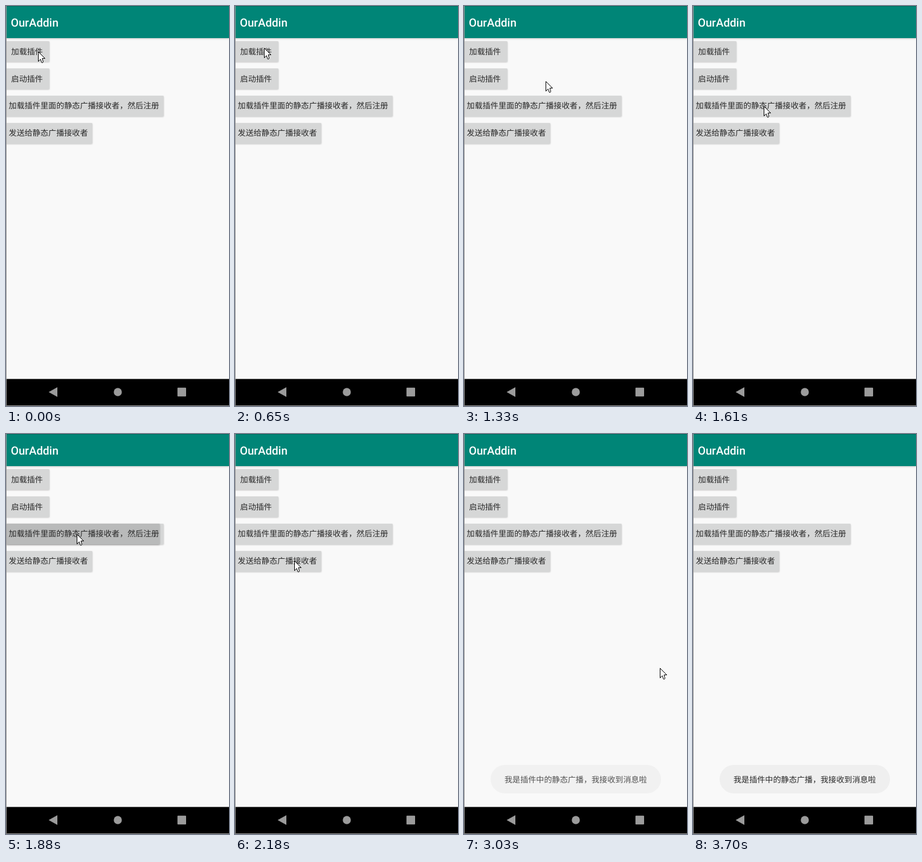
Recreate the animation shown at these times as an HTML page. Size 369 px wide and 660 px high, loop 4.1 s.

```html
<!DOCTYPE html>
<html lang="zh-CN">
<head>
<meta charset="utf-8">
<title>OurAddin</title>
<style>
  html, body { margin: 0; width: 100%; height: 100%; overflow: hidden; background: #f9f9f9; }
  svg { display: block; width: 369px; height: 660px; }

  text { font: 13.1px "Noto Sans CJK SC", "Noto Sans CJK", sans-serif; fill: #282828; text-rendering: geometricPrecision; }
  .title { font: 500 18.75px Roboto, sans-serif; fill: #fff; }
  .bar { fill: #008577; filter: drop-shadow(0 1px 1.5px rgba(0, 0, 0, .2)); }
  .btn { fill: #d6d7d7; filter: drop-shadow(0 1px 1px rgba(0, 0, 0, .2)); }
  .press { fill: #b9baba; filter: drop-shadow(0 1px 1.5px rgba(0, 0, 0, .3)); opacity: 0; }
  .nav { fill: #9b9b9b; }

  /* every change is a hard step in a 4.1 s loop */
  .press, .toast, .cursor { animation: 4100ms step-end infinite; }
  .load { animation-name: load; }
  .register { animation-name: register; }
  .send { animation-name: send; }
  .toast { animation-name: toast; opacity: 0; }
  .cursor { animation-name: move; }

  @keyframes load {
    0%, 26.09%, 100% { opacity: 0; }
    23.16% { opacity: 1; }
  }
  @keyframes register {
    0%, 53.16%, 100% { opacity: 0; width: 253px; }
    45.85% { opacity: 1; width: 253px; }
    49.51% { opacity: 1; width: 260px; }
  }
  @keyframes send {
    0%, 70.97%, 100% { opacity: 0; }
    63.65% { opacity: 1; }
    67.31% { opacity: .5; }
  }
  @keyframes toast {
    0%, 100% { opacity: 0; }
    67.31% { opacity: .3; }
    70.97% { opacity: .55; }
    73.9% { opacity: .8; }
    77.55% { opacity: 1; }
  }
  @keyframes move {
    0% { transform: translate(53px, 75px); }
    12.19% { transform: translate(48px, 72px); }
    15.85% { transform: translate(48px, 69px); }
    19.51% { transform: translate(48px, 70px); }
    29.51% { transform: translate(95px, 99px); }
    32.43% { transform: translate(135px, 124px); }
    36.09% { transform: translate(124px, 148px); }
    39.26% { transform: translate(117px, 165px); }
    49.51% { transform: translate(105px, 197px); }
    53.16% { transform: translate(98px, 209px); }
    57.07% { transform: translate(98px, 210px); }
    67.31% { transform: translate(150px, 245px); }
    70.97% { transform: translate(255px, 325px); }
    73.9% { transform: translate(324px, 386px); }
    77.55% { transform: translate(330px, 430px); }
    80.48% { transform: translate(330px, 500px); }
    83.65% { transform: translate(329px, 575px); }
    86.58% { transform: translate(327px, 636px); }
    90.24%, 100% { transform: translate(400px, 700px); }
  }
</style>
</head>
<body>
<svg width="369" height="660" viewBox="0 0 369 660">
  <rect width="369" height="660" fill="#f9f9f9"/>

  <rect class="bar" width="369" height="53"/>
  <rect width="369" height="1" fill="#006b60"/>
  <text class="title" x="8" y="34">OurAddin</text>

  <rect class="btn" x="-2" y="58" width="74" height="34" rx="1.5"/>
  <rect class="btn" x="-2" y="103" width="74" height="34" rx="1.5"/>
  <rect class="btn" x="-2" y="148" width="263" height="34" rx="1.5"/>
  <rect class="btn" x="-2" y="193" width="145" height="34" rx="1.5"/>

  <rect class="press load" x="1" y="58" width="71" height="34" rx="1.5"/>
  <rect class="press register" x="1" y="148" width="253" height="34"/>
  <rect class="press send" x="1" y="193" width="142" height="34" rx="1.5"/>

  <text x="8.6" y="79.7">加载插件</text>
  <text x="8.6" y="124.5">启动插件</text>
  <text x="4.6" y="169.3">加载插件里面的静态广播接收者，然后注册</text>
  <text x="4.6" y="214">发送给静态广播接收者</text>

  <g class="toast">
    <rect x="44" y="546" width="282" height="47" rx="23.5" fill="#efefef"/>
    <text x="67" y="574.7">我是插件中的静态广播，我接收到消息啦</text>
  </g>

  <rect y="615.4" width="369" height="44.6"/>
  <g class="nav">
    <path d="M70.6 637 85 628.9V645.1Z"/>
    <circle cx="185" cy="637" r="6.7"/>
    <rect x="283.7" y="629.8" width="14.3" height="14.4" rx="1"/>
  </g>
  <path d="M.5 0V659.5H369" fill="none" stroke="#999"/>

  <path class="cursor" d="M.5 .5V16.5L4 12.8 6.2 18.5H7.7L8.5 17 7 11.5H11.5Z" fill="#fff" stroke="#000"/>
</svg>
</body>
</html>
```
